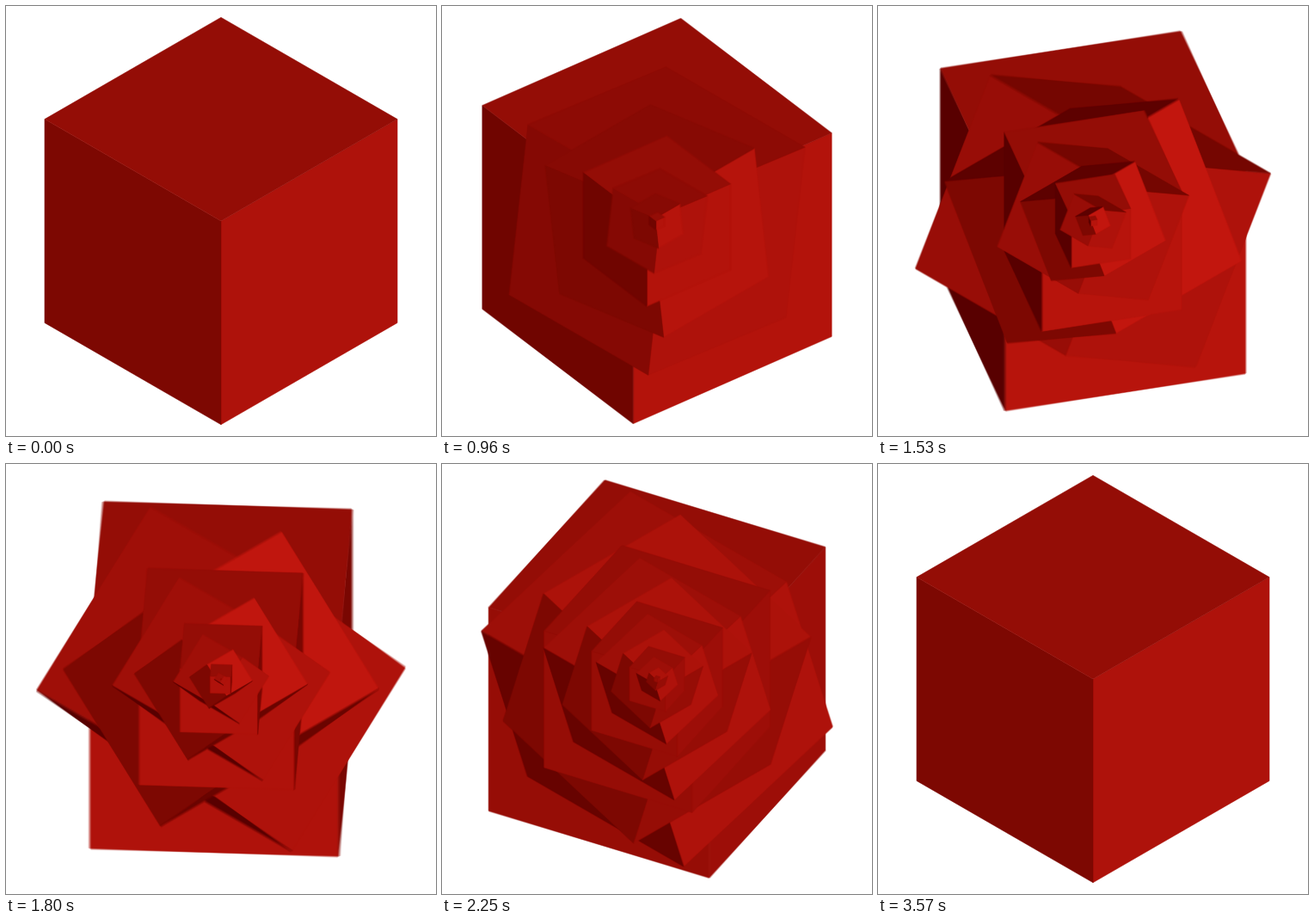
Animation of 500 by 500 pixels, one loop 3.6 s. Source, as an HTML page with a canvas:

```html
<!DOCTYPE html>
<html lang="en">
<head>
<meta charset="utf-8">
<title>Nested turning cubes</title>
<style>
  html, body { margin: 0; width: 100%; height: 100%; overflow: hidden; background: #fff; }
  canvas { display: block; width: 500px; height: 500px; }
</style>
</head>
<body>
<canvas id="stage" width="500" height="500"></canvas>
<script>
const SIZE = 500, STEP = 30, FRAMES = 120;
const SAMPLES = 6, SHUTTER = 0.8;
const HALF = 145;                       // half edge of the outer cube
const LIGHT = [91.3, 42.3, 65.3], AMBIENT = 82.7;
const AXES = [2, 0, 1], SIGNS = [1, 1, -1];
const CORNERS = [[-1, -1], [1, -1], [1, 1], [-1, 1]];

const out = document.getElementById('stage').getContext('2d');
const layer = document.createElement('canvas');
layer.width = layer.height = SIZE;
const ctx = layer.getContext('2d');
ctx.lineWidth = 0.5;
ctx.lineJoin = 'round';

const ease = u => u < 0.5 ? 4 * u ** 3 : 1 - 4 * (1 - u) ** 3;

function rotate(v, axis, angle) {
  const b = (axis + 1) % 3, c = (axis + 2) % 3;
  const cos = Math.cos(angle), sin = Math.sin(angle);
  const r = v.slice();
  r[b] = cos * v[b] - sin * v[c];
  r[c] = sin * v[b] + cos * v[c];
  return r;
}

// Isometric view along (1, 1, 1)
const project = ([x, y, z], h) => [
  SIZE / 2 + (x - y) * Math.SQRT1_2 * h,
  SIZE / 2 + ((x + y) / 2 - z) * Math.sqrt(2 / 3) * h
];

function shade(n) {
  const r = Math.max(88, AMBIENT + n.reduce((sum, c, i) => sum + c * LIGHT[i], 0));
  const g = Math.max(0, 0.21 * (r - 88));
  const b = Math.max(0, 0.17 * (r - 112));
  return `rgb(${Math.round(r)},${Math.round(g)},${Math.round(b)})`;
}

function drawCube(h, axis, angle) {
  for (let k = 0; k < 3; k++) {
    for (const side of [-1, 1]) {
      const normal = [0, 0, 0];
      normal[k] = side;
      const n = rotate(normal, axis, angle);
      if (n[0] + n[1] + n[2] < 1e-6) continue;
      ctx.beginPath();
      for (const [p, q] of CORNERS) {
        const v = [0, 0, 0];
        v[k] = side;
        v[(k + 1) % 3] = p;
        v[(k + 2) % 3] = q;
        ctx.lineTo(...project(rotate(v, axis, angle), h));
      }
      ctx.closePath();
      ctx.fillStyle = ctx.strokeStyle = shade(n);
      ctx.fill();
      ctx.stroke();
    }
  }
}

function drawScene(u) {
  ctx.fillStyle = '#fff';
  ctx.fillRect(0, 0, SIZE, SIZE);
  const angle = ease(u) * Math.PI / 2;
  const count = 28 * u - 12.3 * u * u;  // cubes nested inside the outer one
  drawCube(HALF, AXES[0], angle);
  for (let i = 1; i < count; i++) {
    drawCube(HALF * (1 - i / count) ** 1.5, AXES[i % 3], SIGNS[i % 3] * angle);
  }
}

// Average several moments for motion blur
function render(step) {
  for (let k = 0; k < SAMPLES; k++) {
    const u = (step + 1 + (k + 0.5) / SAMPLES * SHUTTER) / FRAMES;
    drawScene(u % 1);
    out.globalAlpha = 1 / (k + 1);
    out.drawImage(layer, 0, 0);
  }
}

let last = -1;
function tick() {
  const step = Math.floor(performance.now() / STEP) % FRAMES;
  if (step !== last) render(last = step);
  requestAnimationFrame(tick);
}
tick();
</script>
</body>
</html>
```
